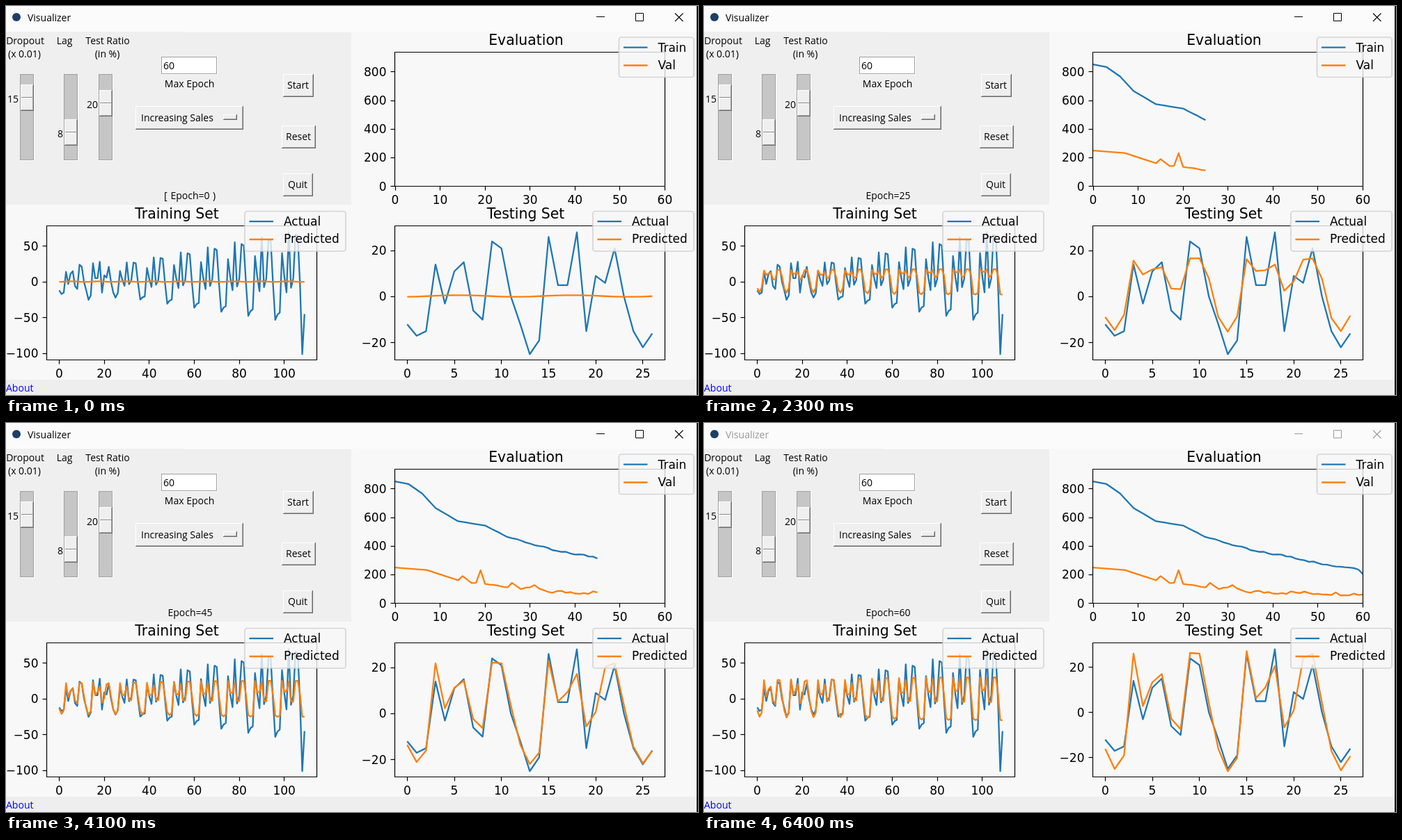
An HTML page with a canvas that plays this animation: 994x560 px, repeating every 6.5 s.

```html
<!DOCTYPE html>
<html lang="en">
<head>
<meta charset="utf-8">
<title>Visualizer</title>
<style>
  html, body { margin: 0; width: 100%; height: 100%; overflow: hidden; background: #f8f8f8; }
  canvas { display: block; }
</style>
</head>
<body>
<canvas id="stage" width="994" height="560"></canvas>
<script>
const ctx = document.getElementById('stage').getContext('2d');
const LOOP = 6500, STEP = 100, LAST = 60, POINTS = 110;
const BLUE = '#1f77b4', ORANGE = '#ff7f0e', PAPER = '#f8f8f8', PANEL = '#efefef';
const UI = '"Open Sans", "Noto Sans", sans-serif';
const PLOT = '"DejaVu Sans", sans-serif';

const lerp = (a, b, u) => a + (b - a) * u;
const clamp = u => Math.max(0, Math.min(1, u));
const range = (n, f) => Array.from({ length: n }, (_, i) => f(i));
const ticks = (from, to, step) => range((to - from) / step + 1, i => from + i * step);

function random(seed) {
  const s = Math.sin(seed * 12.9898) * 43758.5453;
  return s - Math.floor(s);
}

// Sales: a measured opening, then a yearly rhythm that grows, then a sharp drop
const opening = [
  -12, -17, -15, 14, -3, 11, 15, -6, -10, 24, 21, 0, -12, -25,
  -19, 26, 5, 5, 28, -15, 9, 6, 21, 0, -15, -22, -16
];
const season = [-34, -29, -27, 25, 5, -9, 42, -5, 3, 39, 37, -2];
const closing = [-101, -45];
const growth = i => 0.23 + i / 72;
const sales = range(POINTS, i => {
  if (i < opening.length) return opening[i];
  return closing[i - POINTS + closing.length] ?? season[i % 12] * growth(i);
});

// The network learns its own yearly rhythm, pulled a little towards the data
const learned = [-12, -27, -15, 32, 4, 9, 12, 0, -3, 29, 29, 4];
const drive = sales.map((v, i) => lerp(learned[i % 12] * Math.max(1, 1.3 * growth(i)), v, 0.3));

// Early fits are flat, then smooth, then sharp; the output saturates at a rising level
function predict(epoch) {
  const u = clamp(epoch / 15), begun = u * u * (3 - 2 * u);
  const level = 30 * (epoch / LAST) ** 0.6 * begun;
  const soft = clamp((40 - epoch) / 30);
  return drive.map((v, i) => {
    const prev = drive[i - 1] ?? 0, next = drive[i + 1] ?? v;
    const smooth = (prev + 2 * v + next) / 4 + 7;
    const idle = 0.3 + 0.35 * Math.sin((i - 2.5) * Math.PI / 6);
    return idle * (1 - begun) + level * Math.tanh(lerp(v, smooth, soft) / lerp(20, 11, soft));
  });
}

// Polyline through a few [epoch, loss] points, with noise that sets in later
function lossCurve(points, noise, seed) {
  return range(LAST + 1, e => {
    const k = Math.max(1, points.findIndex(p => p[0] >= e));
    const [a, b] = [points[k - 1], points[k]];
    const base = lerp(a[1], b[1], (e - a[0]) / (b[0] - a[0]));
    return base + noise * clamp((e - 20) / 15) * (random(e + seed) - 0.5);
  });
}
const trainLoss = lossCurve([[0, 853], [3, 834], [6, 768], [9, 666], [14, 574], [20, 544],
  [25, 465], [36, 363], [44, 326], [52, 265], [58, 252], [60, 211]], 14, 3);
const valLoss = lossCurve([[0, 250], [7, 233], [14, 161], [15, 190], [17, 142], [18, 143],
  [19, 231], [20, 136], [25, 112], [26, 146], [28, 92], [31, 122], [33, 82], [60, 64]], 26, 8);

function box(x, y, w, h, color) {
  ctx.fillStyle = color;
  ctx.fillRect(x, y, w, h);
}

function text(str, x, y, align = 'left', size = 14, family = UI, color = '#000') {
  ctx.font = `${size}px ${family}`;
  ctx.textAlign = align;
  ctx.fillStyle = color;
  ctx.fillText(str, x, y);
}

function line(points, color, width) {
  ctx.beginPath();
  points.forEach(([x, y]) => ctx.lineTo(x, y));
  ctx.strokeStyle = color;
  ctx.lineWidth = width;
  ctx.stroke();
}

function bevel(x, y, w, h, face, sunken = false) {
  box(x, y, w, h, sunken ? '#fff' : '#696969');
  box(x, y, w - 1, h - 1, sunken ? '#a0a0a0' : '#fff');
  if (!sunken) box(x + 1, y + 1, w - 2, h - 2, '#a8a8a8');
  box(x + 1, y + 1, w - 3, h - 3, face);
}

function titleBar(active) {
  const ink = active ? '#000' : '#999';
  box(0, 0, 994, 37, '#fbfbfb');
  ctx.beginPath();
  ctx.arc(15, 16, 6, 0, Math.PI * 2);
  ctx.fillStyle = '#1d3f66';
  ctx.fill();
  text('Visualizer', 31, 22, 'left', 14, UI, ink);
  line([[848, 15.5], [860, 15.5]], ink, 1);
  ctx.strokeRect(904.5, 10.5, 11, 11);
  line([[961, 10.5], [972.5, 22]], ink, 1.1);
  line([[972.5, 10.5], [961, 22]], ink, 1.1);
}

function slider(x, thumb, value, labelX) {
  bevel(x, 98, 21, 125, '#c6c6c6', true);
  bevel(x + 1, thumb, 19, 38, PANEL);
  box(x + 2, thumb + 18, 16, 1, '#888');
  box(x + 2, thumb + 19, 16, 1, '#fff');
  text(value, labelX, thumb + 26, 'right');
}

function button(label, x, y, w) {
  bevel(x, y, w, 33, PANEL);
  text(label, x + w / 2 - 0.5, y + 21, 'center');
}

function controls(epoch) {
  box(0, 37, 496, 249, PANEL);
  box(256, 37, 240, 1, PAPER);
  text('Dropout', 27.5, 55, 'center');
  text('(x 0.01)', 26.5, 74, 'center');
  text('Lag', 84, 55, 'center');
  text('Test Ratio', 146, 55, 'center');
  text('(in %)', 145.5, 74, 'center');
  slider(20, 113, '15', 18);
  slider(83, 163, '8', 82);
  slider(133, 121, '20', 132);
  bevel(223, 73, 81, 26, '#fff', true);
  text('60', 226, 91);
  text('Max Epoch', 263.5, 117, 'center');
  bevel(186, 144, 155, 34, PANEL);
  text('Increasing Sales', 194, 166);
  bevel(312, 156, 20, 8, PANEL);
  button('Start', 398, 98, 44);
  button('Reset', 396, 172, 49);
  button('Quit', 398, 241, 43);
  text('Epoch=' + epoch, 264.5, 278, 'center');
  if (!epoch) {
    text('[', 227, 278);
    text(')', 297, 278);
  }
}

function legend(x, y, w, names) {
  ctx.beginPath();
  ctx.roundRect(x, y, w, 57.5, 3.5);
  ctx.fillStyle = 'rgba(248,248,248,0.8)';
  ctx.fill();
  ctx.strokeStyle = 'rgba(204,204,204,0.8)';
  ctx.lineWidth = 1.7;
  ctx.stroke();
  names.forEach((name, i) => {
    const cy = y + 14.7 + i * 25.8;
    line([[x + 6.5, cy], [x + 41, cy]], i ? ORANGE : BLUE, 2.3);
    text(name, x + 56, Math.round(y + 20.7 + i * 25.2), 'left', 17, PLOT);
  });
}

const label = n => String(n).replace('-', '\u2212');

// x0, y0: pixel of the value 0; sx, sy: pixels per unit
function chart(p) {
  const w = 388, h = 193, bottom = p.top + h;
  const px = v => p.x0 + v * p.sx, py = v => p.y0 - v * p.sy;
  const snap = v => Math.floor(v) + 0.5;
  text(p.title, p.titleX, p.titleY, 'center', 20.4, PLOT);
  for (const v of p.xTicks) {
    const x = snap(px(v));
    line([[x, bottom], [x, bottom + 6]], '#000', 1.2);
    text(label(v), px(v), Math.round(bottom + 25), 'center', 17, PLOT);
  }
  for (const v of p.yTicks) {
    const y = snap(py(v));
    line([[p.left - 6, y], [p.left, y]], '#000', 1.2);
    text(label(v), p.left - 12, Math.round(py(v) + 6), 'right', 17, PLOT);
  }
  ctx.save();
  ctx.beginPath();
  ctx.rect(p.left, p.top, w, h);
  ctx.clip();
  p.series.forEach((s, k) => line(s.map((v, i) => [px(i), py(v)]), k ? ORANGE : BLUE, 2.3));
  ctx.restore();
  ctx.strokeStyle = '#000';
  ctx.lineWidth = 1.2;
  ctx.strokeRect(p.left, p.top, w, h);
  legend(...p.legend);
}

// Vertical scale that fits all values with a 5% margin
function fitY(series, top) {
  const all = series.flat(), max = Math.max(...all), min = Math.min(...all);
  const span = max - min, sy = 193 / (span * 1.1);
  return { y0: top + (max + span * 0.05) * sy, sy };
}

function draw(time) {
  const tick = Math.floor(time % LOOP / STEP);
  const epoch = Math.min(LAST, Math.floor(tick * 1.1 + 0.15));
  const train = [sales, predict(epoch)];
  const test = train.map(s => s.slice(0, opening.length));
  const names = ['Actual', 'Predicted'];

  ctx.lineJoin = 'round';
  box(0, 0, 994, 560, PAPER);
  titleBar(tick < 64);
  controls(epoch);
  chart({
    title: 'Evaluation', titleX: 747, titleY: 56, left: 558.5, top: 66.5,
    x0: 559, sx: 6.457, y0: 259.5, sy: 0.2057,
    xTicks: ticks(0, 60, 10), yTicks: ticks(0, 800, 200),
    series: [trainLoss, valLoss].map(s => s.slice(0, epoch + 1)),
    legend: [880.5, 45, 107.5, ['Train', 'Val']]
  });
  chart({
    title: 'Training Set', titleX: 245.5, titleY: 306, left: 58.5, top: 316.5,
    x0: 76.5, sx: 3.232, ...fitY(train, 317),
    xTicks: ticks(0, 100, 20), yTicks: ticks(-100, 50, 50),
    series: train, legend: [343, 295.5, 145, names]
  });
  chart({
    title: 'Testing Set', titleX: 746.5, titleY: 306, left: 558.5, top: 316.5,
    x0: 576.3, sx: 13.54, ...fitY(test, 317),
    xTicks: ticks(0, 25, 5), yTicks: ticks(-20, 20, 20),
    series: test, legend: [843, 295.5, 145, names]
  });
  box(0, 538, 992, 22, '#eeeeee');
  text('About', 0, 555, 'left', 14, UI, '#0000ff');
  box(992, 0, 2, 560, '#1a1a1a');
}

const start = performance.now();
function loop() {
  draw(performance.now() - start);
  requestAnimationFrame(loop);
}
loop();
</script>
</body>
</html>
```
